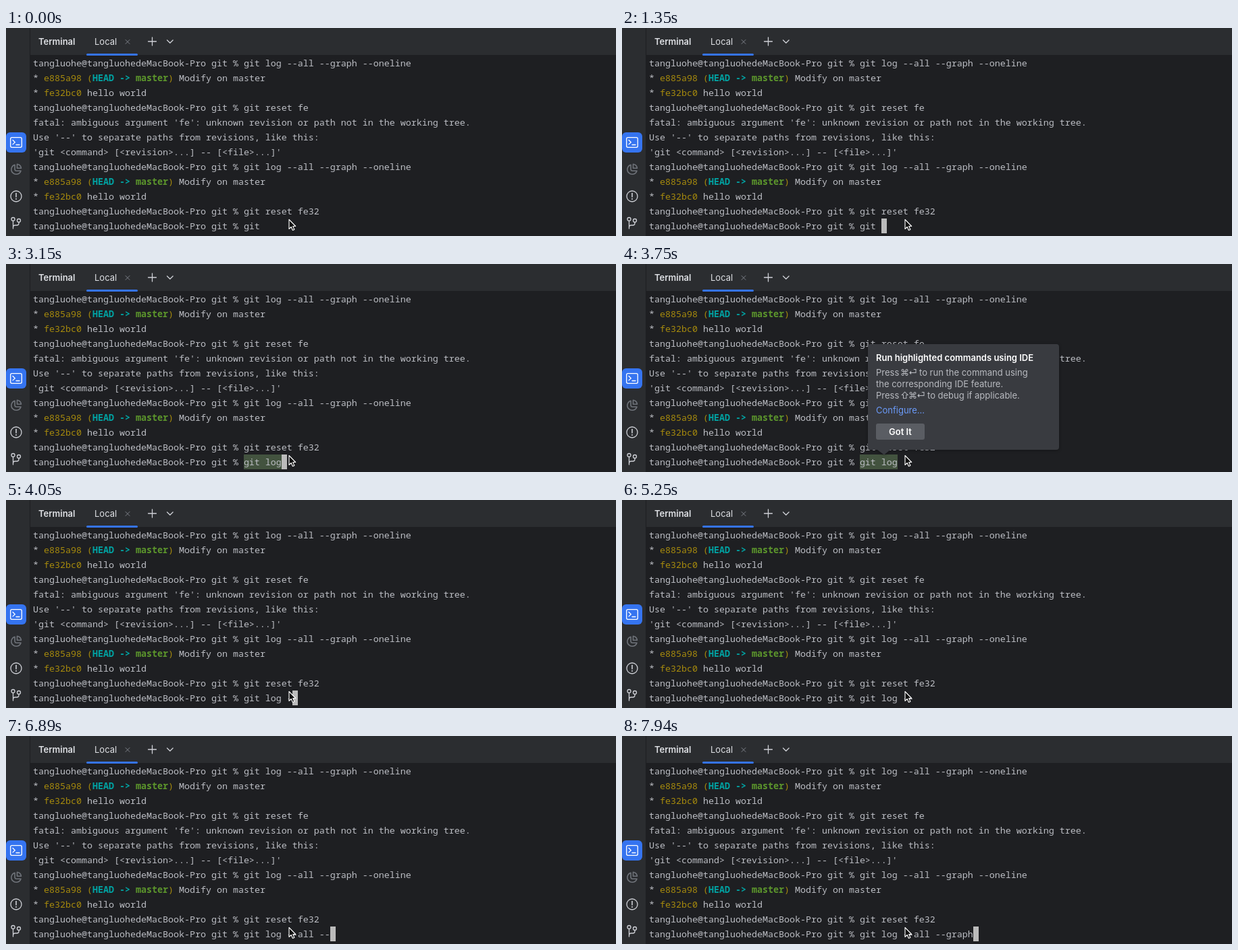
Write an HTML page that moves like this. It is 903 px wide and 309 px high and loops after 8 s.

```html
<!DOCTYPE html>
<html lang="en">
<head>
<meta charset="utf-8">
<title>Terminal</title>
<style>
  html, body { margin: 0; width: 100%; height: 100%; overflow: hidden; background: #1e1f22; }
  svg { display: block; }
  text { white-space: pre; font: 13px Inter, sans-serif; fill: #dfe1e5; }
  .mono text { font: 13.3333px "Noto Sans Mono", monospace; fill: #bcbec4; }
  .bold { font-weight: 600; }
  .hash { fill: #a68a0d; }
  .head { fill: #00a3a3; font-weight: 700; }
  .branch { fill: #5c962c; font-weight: 700; }
  .line { fill: none; stroke: #ced0d6; stroke-width: 1.3; stroke-linecap: round; stroke-linejoin: round; }
  #tip { filter: drop-shadow(0 1px 2px rgba(0, 0, 0, .35)); }
  #tip .body text { fill: #b9bbc0; }
</style>
</head>
<body>
<svg width="903" height="309" viewBox="0 0 903 309">
  <rect width="903" height="309" fill="#1e1f22"/>
  <rect width="35" height="309" fill="#2b2d30"/>
  <rect x="36" width="867" height="40" fill="#2b2d30"/>

  <!-- header -->
  <text class="bold" x="48" y="25">Terminal</text>
  <text x="131" y="25">Local</text>
  <path class="line" d="M177 17.5l6 6m0-6l-6 6" style="stroke:#7c8088;stroke-width:1"/>
  <path class="line" d="M210.5 20h12M216.5 14v12M238.5 18l4.3 4.3 4.3-4.3"/>
  <rect x="119" y="38" width="76" height="3" rx="1.5" fill="#3574f0"/>

  <!-- side bar -->
  <rect x="0" y="155" width="30" height="30" rx="6" fill="#3574f0"/>
  <g class="line" style="stroke:#fff">
    <rect x="6.7" y="162.7" width="16.6" height="14.6" rx="2"/>
    <path d="M10 166.5l3.3 3.2-3.3 3.2M15 173.5h5"/>
  </g>
  <g class="line" style="stroke:#6f737a;stroke-width:1.6">
    <path d="M13 203.2a7.2 7.2 0 1 0 9 9H15.5q-2.500-.2-2.500-2.500z"/>
    <path d="M16.500 202.300a7 7 0 0 1 6 6h-6z"/>
  </g>
  <g class="line">
    <circle cx="15" cy="250" r="8"/>
    <path d="M15 245.500v5.500" style="stroke-width:1.600"/>
    <circle cx="15" cy="254" r=".4"/>
    <circle cx="10.500" cy="284" r="2.500"/>
    <circle cx="19" cy="286" r="2.500"/>
    <path d="M10.500 286.500V298M19 288.500v1.500q0 3-3 3h-2.500q-3 0-3 3"/>
  </g>

  <g class="mono" id="screen">
    <rect id="mark" x="352" y="283" width="56" height="22" fill="#43533f"/>
    <rect id="cursor" y="283" width="8" height="22" fill="#bbb"/>
  </g>

  <g id="tip">
    <path d="M368 119H643q4 0 4 4V272q0 4-4 4H397L388 283.500 378 276H368q-4 0-4-4V123q0-4 4-4z" fill="#393b40"/>
    <text class="bold" x="376" y="144" style="fill:#fff">Run highlighted commands using IDE</text>
    <g class="body">
      <text y="166"><tspan x="376">Press</tspan><tspan x="412">⌘</tspan><tspan x="424">⏎</tspan><tspan x="440">to run the command using</tspan></text>
      <text x="376" y="183">the corresponding IDE feature.</text>
      <text y="200"><tspan x="376">Press</tspan><tspan x="412">⇧</tspan><tspan x="424">⌘</tspan><tspan x="436">⏎</tspan><tspan x="452">to debug if applicable.</tspan></text>
    </g>
    <text x="376" y="222" style="fill:#6b9bfa">Configure...</text>
    <rect x="376" y="237" width="72" height="24" rx="3" fill="#5a5d63"/>
    <text class="bold" x="412" y="254" text-anchor="middle" style="fill:#fff">Got It</text>
  </g>

  <path d="M419 284.500v14l3.200-3 2.200 5 2.500-1.100-2.200-4.900h4z" fill="#111" stroke="#fff" stroke-width="1.100" stroke-linejoin="round"/>
</svg>
<script>
const LOOP = 8000, CELL = 8, ROW = 22, LEFT = 40, TOP = 41;
const $ = id => document.getElementById(id);
const span = (kind, s) => `<tspan class="${kind}">${s}</tspan>`;

const prompt = 'tangluohe@tangluohedeMacBook-Pro git % ';
const log = [
  prompt + 'git log --all --graph --oneline',
  '* ' + span('hash', 'e885a98 (') + span('head', 'HEAD -&gt; ') + span('branch', 'master') +
    span('hash', ')') + ' Modify on master',
  '* ' + span('hash', 'fe32bc0') + ' hello world'
];
const rows = [
  ...log,
  prompt + 'git reset fe',
  "fatal: ambiguous argument 'fe': unknown revision or path not in the working tree.",
  "Use '--' to separate paths from revisions, like this:",
  "'git &lt;command&gt; [&lt;revision&gt;...] -- [&lt;file&gt;...]'",
  ...log,
  prompt + 'git reset fe32',
  prompt
];
const lines = rows.map((html, i) => {
  const el = document.createElementNS('http://www.w3.org/2000/svg', 'text');
  el.setAttribute('x', LEFT);
  el.setAttribute('y', TOP + 16 + i * ROW);
  el.innerHTML = html;
  $('screen').append(el);
  return el;
});
const input = lines[lines.length - 1];

// [start, typed command, cursor lit]
const steps = [
  [0, 'git ', 0], [300, 'git ', 1], [900, 'git ', 0], [1350, 'git ', 1],
  [1950, 'git ', 0], [2400, 'git ', 1],
  [2700, 'git l', 1], [3000, 'git lo', 1], [3150, 'git log', 1],
  [3300, 'git log ', 1], [3750, 'git log ', 0],
  [4050, 'git log -', 1], [4200, 'git log --', 1], [5250, 'git log --', 0],
  [5540, 'git log --o', 1], [6140, 'git log --', 1],
  [6200, 'git log --a', 1], [6440, 'git log --all', 1], [6590, 'git log --all ', 1],
  [6740, 'git log --all -', 1], [6890, 'git log --all --', 1],
  [7190, 'git log --all --g', 1], [7490, 'git log --all --gr', 1],
  [7640, 'git log --all --gra', 1], [7790, 'git log --all --grap', 1],
  [7940, 'git log --all --graph', 1]
];
const show = (id, on) => $(id).setAttribute('visibility', on ? 'visible' : 'hidden');

function draw(now) {
  const t = now % LOOP;
  const [, typed, lit] = steps.findLast(s => s[0] <= t);
  const full = prompt + typed;
  if (input.textContent !== full) input.textContent = full;
  $('cursor').setAttribute('x', LEFT + full.length * CELL);
  show('cursor', lit);
  show('mark', t >= 3150 && t < 4050);
  show('tip', t >= 3300 && t < 4050);
}

const start = performance.now();
function tick() {
  draw(performance.now() - start);
  requestAnimationFrame(tick);
}
tick();
</script>
</body>
</html>
```
